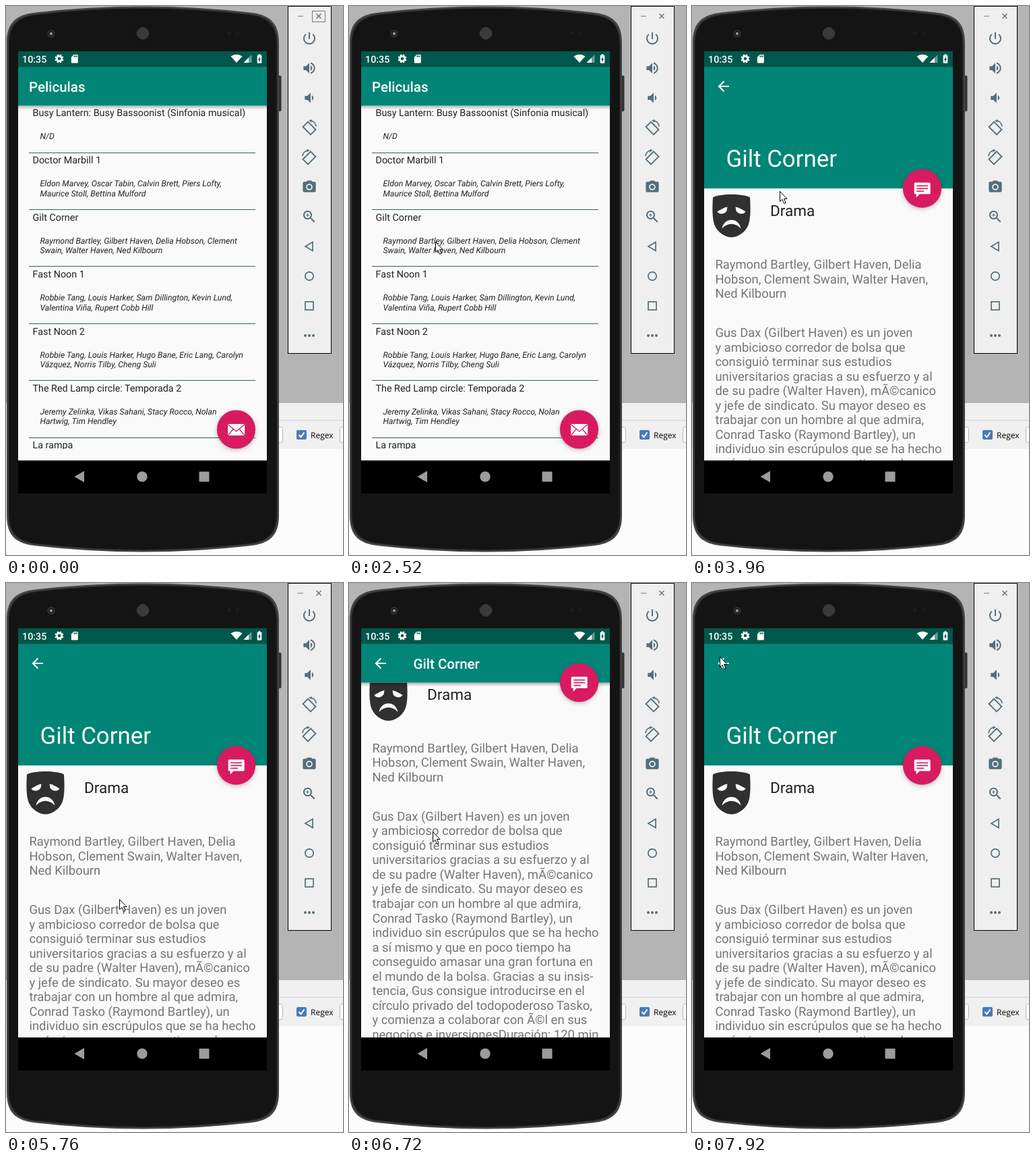
Write an HTML page with a canvas that moves like this. It is 500 px wide and 813 px high and loops after 8 s.

```html
<!DOCTYPE html>
<html lang="es">
<head>
<meta charset="utf-8">
<title>Peliculas</title>
<style>
html, body { margin: 0; width: 100%; height: 100%; overflow: hidden; background: #b4b4b4; }
canvas { display: block; }
</style>
</head>
<body>
<canvas id="stage" width="500" height="813"></canvas>
<script>
const ctx = document.getElementById('stage').getContext('2d');
const LOOP = 8000, STEP = 120, DP = 1.025;
const SCREEN = { x: 18, y: 67, w: 369, bar: 90.5, bottom: 673, end: 722 };
const TEAL = '#008577', PINK = '#d81b60', SLATE = '#546e7a';

const films = [
  ['Busy Lantern: Busy Bassoonist (Sinfonia musical)', 'N/D'],
  ['Doctor Marbill 1', 'Eldon Marvey, Oscar Tabin, Calvin Brett, Piers Lofty,', 'Maurice Stoll, Bettina Mulford'],
  ['Gilt Corner', 'Raymond Bartley, Gilbert Haven, Delia Hobson, Clement', 'Swain, Walter Haven, Ned Kilbourn'],
  ['Fast Noon 1', 'Robbie Tang, Louis Harker, Sam Dillington, Kevin Lund,', 'Valentina Viña, Rupert Cobb Hill'],
  ['Fast Noon 2', 'Robbie Tang, Louis Harker, Hugo Bane, Eric Lang, Carolyn', 'Vázquez, Norris Tilby, Cheng Suli'],
  ['The Red Lamp circle: Temporada 2', 'Jeremy Zelinka, Vikas Sahani, Stacy Rocco, Nolan', 'Hartwig, Tim Hendley'],
  ['La rampa']
];
const cast = ['Raymond Bartley, Gilbert Haven, Delia', 'Hobson, Clement Swain, Walter Haven,', 'Ned Kilbourn'];
const plot = [
  'Gus Dax (Gilbert Haven) es un joven',
  'y ambicioso corredor de bolsa que',
  'consiguió terminar sus estudios',
  'universitarios gracias a su esfuerzo y al',
  'de su padre (Walter Haven), mÃ©canico',
  'y jefe de sindicato. Su mayor deseo es',
  'trabajar con un hombre al que admira,',
  'Conrad Tasko (Raymond Bartley), un',
  'individuo sin escrúpulos que se ha hecho',
  'a sí mismo y que en poco tiempo ha',
  'conseguido amasar una gran fortuna en',
  'el mundo de la bolsa. Gracias a su insis-',
  'tencia, Gus consigue introducirse en el',
  'círculo privado del todopoderoso Tasko,',
  'y comienza a colaborar con Ã©l en sus',
  'negocios e inversionesDuración: 120 min'
];

// Keys: [time, values...], linear in between
const pointer = [
  [240, 0, 533], [480, 159, 238], [720, 159, 238], [1080, 122, 258], [1320, 122, 258],
  [1440, 122, 260], [1680, 123, 258], [1800, 123, 258], [2160, 128, 349], [3360, 128, 349],
  [3480, 130, 280], [3600, 130, 204], [3720, 130, 215], [3960, 130, 274], [4200, 130, 290],
  [4440, 15, 128], [4800, 291, 470], [5040, 180, 613], [5280, 110, 505], [5400, 60, 440],
  [5520, 6, 380], [5760, 168, 468], [5880, 172, 506], [6000, 168, 506], [6720, 124, 368],
  [6840, 120, 375], [7200, 100, 506], [7560, 11, 153], [7680, 16, 140], [7920, 41, 109]
];
const scrolling = [
  [5160, 0], [5400, 138.4], [5520, 138.4], [5760, 0], [6000, 0],
  [6600, 130], [6720, 138.4], [6840, 130], [7200, 0]
];
// Reveal edge, drop and dimming of the page below
const opening = [[3480, 672, 27, 0.01], [3600, 637, 26, 0.04], [3720, 190, 7, 0.08], [3840, 66, 0, 0.1]];

const glyphs = {
  power: 'M13 3h-2v10h2V3zm4.83 2.17l-1.42 1.42C17.99 7.86 19 9.81 19 12c0 3.87-3.13 7-7 7s-7-3.13-7-7c0-2.19 1.01-4.14 2.58-5.42L6.17 5.17C4.23 6.82 3 9.26 3 12c0 4.97 4.03 9 9 9s9-4.03 9-9c0-2.74-1.23-5.18-3.17-6.83z',
  louder: 'M3 9v6h4l5 5V4L7 9H3zm13.5 3c0-1.77-1.02-3.29-2.5-4.03v8.05c1.48-.73 2.5-2.25 2.5-4.02zM14 3.23v2.06c2.89.86 5 3.54 5 6.71s-2.11 5.85-5 6.71v2.06c4.01-.91 7-4.49 7-8.77s-2.99-7.86-7-8.77z',
  quieter: 'M18.5 12c0-1.77-1.02-3.29-2.5-4.03v8.05c1.48-.73 2.5-2.25 2.5-4.02zM5 9v6h4l5 5V4L9 9H5z',
  camera: 'M9 2L7.17 4H4c-1.1 0-2 .9-2 2v12c0 1.1.9 2 2 2h16c1.1 0 2-.9 2-2V6c0-1.1-.9-2-2-2h-3.17L15 2H9zm3 15c-2.76 0-5-2.24-5-5s2.24-5 5-5 5 2.24 5 5-2.24 5-5 5zM8.8 12a3.2 3.2 0 1 0 6.4 0a3.2 3.2 0 1 0-6.4 0z',
  zoom: 'M15.5 14h-.79l-.28-.27C15.41 12.59 16 11.11 16 9.5 16 5.91 13.09 3 9.5 3S3 5.91 3 9.5 5.91 16 9.5 16c1.61 0 3.09-.59 4.23-1.57l.27.28v.79l5 4.99L20.49 19l-4.99-5zm-6 0C7.01 14 5 11.99 5 9.5S7.01 5 9.5 5 14 7.01 14 9.5 11.99 14 9.5 14zM12 10h-2v2H9v-2H7V9h2V7h1v2h2v1z',
  back: 'M20 11H7.83l5.59-5.59L12 4l-8 8 8 8 1.41-1.41L7.83 13H20v-2z',
  card: 'M18 2h-8L4.02 8 4 20c0 1.1.9 2 2 2h12c1.1 0 2-.9 2-2V4c0-1.1-.9-2-2-2zm-6 6h-2V4h2v4zm3 0h-2V4h2v4zm3 0h-2V4h2v4z',
  battery: 'M15.67 4H14V2h-4v2H8.33C7.6 4 7 4.6 7 5.33v15.33C7 21.4 7.6 22 8.33 22h7.33c.74 0 1.34-.6 1.34-1.33V5.33C17 4.6 16.4 4 15.67 4zM11 20v-5.5H9L13 7v5.5h2L11 20z'
};
for (const k in glyphs) glyphs[k] = new Path2D(glyphs[k]);

const mix = (a, b, u) => a + (b - a) * u;

function sample(keys, t) {
  if (t <= keys[0][0]) return keys[0].slice(1);
  for (let i = 1; i < keys.length; i++) {
    const [a, b] = [keys[i - 1], keys[i]];
    if (t <= b[0]) {
      const u = (t - a[0]) / (b[0] - a[0]);
      return a.slice(1).map((v, j) => mix(v, b[j + 1], u));
    }
  }
  return keys[keys.length - 1].slice(1);
}

function box(x, y, w, h, color) {
  ctx.fillStyle = color;
  ctx.fillRect(x, y, w, h);
}
function paint(color, edge) {
  if (color) { ctx.fillStyle = color; ctx.fill(); }
  if (edge) { ctx.strokeStyle = edge; ctx.stroke(); }
}
function round(x, y, w, h, r, color, edge) {
  ctx.beginPath();
  ctx.roundRect(x, y, w, h, r);
  paint(color, edge);
}
function disc(x, y, r, color, edge) {
  ctx.beginPath();
  ctx.arc(x, y, r, 0, 7);
  paint(color, edge);
}
function poly(points, color, edge, open) {
  ctx.beginPath();
  points.forEach(([x, y]) => ctx.lineTo(x, y));
  if (!open) ctx.closePath();
  paint(color, edge);
}
function text(str, x, y, size, color, style = '', family = 'Roboto') {
  ctx.font = `${style} ${size}px ${family}, sans-serif`;
  ctx.fillStyle = color;
  ctx.fillText(str, x, y);
}
function icon(name, x, y, size, color) {
  ctx.save();
  ctx.translate(x - size / 2, y - size / 2);
  ctx.scale(size / 24, size / 24);
  ctx.fillStyle = color;
  ctx.fill(glyphs[name], 'evenodd');
  ctx.restore();
}
function clipped(x, y, w, h, draw) {
  ctx.save();
  ctx.beginPath();
  ctx.rect(x, y, w, h);
  ctx.clip();
  draw();
  ctx.restore();
}

function desktop() {
  box(0, 0, 500, 588, '#b4b4b4');
  box(0, 588, 500, 68, '#f0f0f0');
  box(0, 613, 500, 1, '#d4d4d4');
  box(0, 656, 500, 157, '#fcfcfc');
  round(380.5, 623.5, 30, 23, 3, '#fff', '#b4b4b4');
  round(495.5, 623.5, 30, 23, 3, '#fff', '#b4b4b4');
  round(431, 628, 15, 14, 2, '#4a7ab8');
  ctx.lineWidth = 2;
  poly([[434.5, 635], [437.5, 638.5], [442.5, 631.5]], null, '#fff', true);
  ctx.lineWidth = 1;
  text('Regex', 452, 639.5, 12, '#000', '', '"Open Sans"');
}

// Body with gently arched top and bottom
function shell(inset, color) {
  ctx.save();
  ctx.translate(203, 404.5);
  ctx.scale(1 - inset / 202, 1 - inset / 404);
  ctx.beginPath();
  for (const s of [1, -1]) {
    ctx.lineTo(-202 * s, -350 * s);
    ctx.bezierCurveTo(-202 * s, -380 * s, -188 * s, -392 * s, -158 * s, -395 * s);
    ctx.quadraticCurveTo(0, -413 * s, 158 * s, -395 * s);
    ctx.bezierCurveTo(188 * s, -392 * s, 202 * s, -380 * s, 202 * s, -350 * s);
  }
  ctx.closePath();
  paint(color);
  ctx.restore();
}

function phone() {
  round(402, 103, 6.5, 53, 2, '#333');
  shell(0, '#444');
  shell(2.2, '#2a2a2a');
  shell(3.6, '#141414');
  disc(67, 41, 5.5, '#3a3a3a');
  disc(67, 41, 4, '#15181c');
  disc(67, 41, 2.3, '#868c93');
  disc(203, 40.5, 9.5, '#2c2c2c');
  for (let j = -4; j <= 4; j++) for (let i = -4; i <= 4; i++)
    if (i * i + j * j < 18) box(202.5 + i * 2, 40 + j * 2, 1, 1, '#666');
  disc(331, 40, 3, '#201c1c');
  disc(343, 40, 2.5, '#1d1a1a');
}

function turnIcon(y, dir) {
  ctx.save();
  ctx.translate(450, y);
  ctx.scale(dir, 1);
  ctx.lineWidth = 1.8;
  poly([[-2, -8.5], [9.5, 3], [2, 10.5], [-9.5, -1]], null, SLATE);
  ctx.lineWidth = 1.5;
  ctx.beginPath();
  ctx.arc(0, 0, 10.3, -1.4, -0.15);
  paint(null, SLATE);
  poly([[-1, -10.5], [3.5, -12], [3.5, -7.5]], SLATE);
  ctx.restore();
}

function toolPanel(focused) {
  ctx.lineWidth = 1;
  box(418, 0, 65, 515, '#000');
  box(419, 1, 63, 513, '#efefef');
  box(433, 14.5, 8, 1.3, '#8a979d');
  ctx.lineWidth = 1.4;
  poly([[460.5, 11.5], [467.5, 18.5]], null, '#66757d', true);
  poly([[467.5, 11.5], [460.5, 18.5]], null, '#66757d', true);
  ctx.lineWidth = 1;
  if (focused) {
    ctx.setLineDash([1, 1]);
    ctx.strokeStyle = '#000';
    ctx.strokeRect(454.5, 7.5, 19, 16);
    ctx.setLineDash([]);
  }
  icon('power', 450, 48, 24, SLATE);
  icon('louder', 450, 92, 23, SLATE);
  icon('quieter', 450, 136, 23, SLATE);
  turnIcon(180, 1);
  turnIcon(224, -1);
  icon('camera', 450, 268, 23, SLATE);
  icon('zoom', 450, 312, 24, SLATE);
  ctx.lineWidth = 1.7;
  poly([[455, 349.5], [455, 362.5], [444, 356]], null, SLATE);
  disc(450, 400, 6.2, null, SLATE);
  ctx.strokeStyle = SLATE;
  ctx.strokeRect(444, 438, 12, 12);
  for (const x of [444, 450, 456]) disc(x, 488, 2, SLATE);
  ctx.lineWidth = 1;
}

function statusBar() {
  box(SCREEN.x, SCREEN.y, SCREEN.w, SCREEN.bar - SCREEN.y, '#00574b');
  text('10:35', 24, 83.8, 14.35, '#fff', '500');
  ctx.lineWidth = 2.6;
  for (let i = 0; i < 4; i++) {
    const a = i * Math.PI / 4 + 0.39, dx = 6.4 * Math.cos(a), dy = 6.4 * Math.sin(a);
    poly([[79 - dx, 78 - dy], [79 + dx, 78 + dy]], null, '#fff', true);
  }
  ctx.lineWidth = 1;
  disc(79, 78, 5, '#fff');
  disc(79, 78, 2.3, '#00574b');
  icon('card', 101.8, 78.3, 15, '#fff');
  ctx.beginPath();
  ctx.moveTo(342, 84);
  ctx.lineTo(333.5, 74.5);
  ctx.quadraticCurveTo(342, 69, 350.5, 74.5);
  ctx.closePath();
  paint('#fff');
  poly([[364.5, 72], [364.5, 84], [352.5, 84]], 'rgba(255,255,255,.4)');
  poly([[360, 76.5], [360, 84], [352.5, 84]], '#fff');
  icon('battery', 376, 78, 16, '#fff');
}

function shadow(y) {
  const g = ctx.createLinearGradient(0, y, 0, y + 6);
  g.addColorStop(0, 'rgba(0,0,0,.28)');
  g.addColorStop(1, 'rgba(0,0,0,0)');
  box(SCREEN.x, y, SCREEN.w, 6, g);
}

function fab(y) {
  ctx.save();
  ctx.shadowColor = 'rgba(0,0,0,.25)';
  ctx.shadowBlur = 6;
  ctx.shadowOffsetY = 2;
  disc(341.5, y, 28.6, PINK);
  ctx.restore();
}

function envelope(x, y) {
  round(x - 12.5, y - 8.5, 25, 17, 1.5, '#fff');
  ctx.lineWidth = 1.3;
  poly([[x - 12, y - 7.5], [x, y + 2.5], [x + 12, y - 7.5]], null, PINK, true);
  poly([[x - 12, y + 8], [x - 4.5, y - 1]], null, PINK, true);
  poly([[x + 12, y + 8], [x + 4.5, y - 1]], null, PINK, true);
  ctx.lineWidth = 1;
}

function bubble(x, y) {
  round(x - 12, y - 9, 24, 17, 1.5, '#fff');
  poly([[x - 9, y + 7], [x - 9, y + 13], [x - 3, y + 7]], '#fff');
  [17, 17, 11].forEach((w, i) => box(x - 8.5, y - 5 + i * 4, w, 1.7, PINK));
}

function listPage() {
  box(SCREEN.x, SCREEN.bar, SCREEN.w, 583, '#fafafa');
  clipped(SCREEN.x, 148, SCREEN.w, 508, () => {
    let y = 163.1;
    for (const [title, ...names] of films) {
      text(title, 39.5, y, 14 * DP, '#212121');
      names.forEach((s, i) => text(s, 50.5, y + 34 + i * 14.4, 12 * DP, '#212121', 'italic'));
      y += names.length > 1 ? 84.4 : 70.2;
      box(34, Math.round(y - 16.7), 336, 1, '#3d5f59');
    }
  });
  box(SCREEN.x, SCREEN.bar, SCREEN.w, 57, TEAL);
  shadow(147.5);
  text('Peliculas', 34, 127, 20 * DP, '#fff', '500');
  fab(627);
  envelope(341.7, 627.5);
}

function mask(y) {
  ctx.save();
  ctx.translate(58.5, y);
  ctx.fillStyle = '#303030';
  ctx.fill(new Path2D('M-27.5 -27C-18 -33 18 -33 27.5 -27C28.5 -10 28.5 5 25 14C20 26 8 32 0 32C-8 32 -20 26 -25 14C-28.5 5 -28.5 -10 -27.5 -27Z'));
  ctx.fillStyle = '#fafafa';
  for (const side of [-1, 1]) {
    ctx.save();
    ctx.scale(side, 1);
    ctx.fill(new Path2D('M6 -13C11 -12 16 -9 21 -6C18 -1 10 -2 7 -7Z'));
    ctx.restore();
  }
  ctx.fill(new Path2D('M-14 19C-11 2 11 2 14 19C6 10 -6 10 -14 19Z'));
  ctx.restore();
}

function detailPage(scroll) {
  const up = Math.min(scroll, 122.7), u = up / 122.7, edge = 270.2 - up;
  box(SCREEN.x, SCREEN.bar, SCREEN.w, 583, '#fafafa');
  clipped(SCREEN.x, edge, SCREEN.w, SCREEN.bottom - edge, () => {
    mask(310.5 - scroll);
    text('Drama', 116, 311 - scroll, 22 * DP, '#212121');
    cast.forEach((s, i) => text(s, 34.4, 389 + i * 21.56 - scroll, 18 * DP, '#757575'));
    plot.forEach((s, i) => text(s, 34.4, 490 + i * 21.56 - scroll, 18 * DP, '#757575'));
  });
  box(SCREEN.x, SCREEN.bar, SCREEN.w, edge - SCREEN.bar, TEAL);
  if (u === 1) shadow(edge);
  icon('back', 46.7, 119, 24 * DP, '#fff');
  text(films[2][0], mix(50.5, 95.5, u), mix(238.2, 126.5, u), mix(34, 20, u) * DP, '#fff', u > 0.95 ? '500' : '');
  fab(edge);
  bubble(341.7, edge + 0.3);
}

function navBar() {
  box(SCREEN.x, SCREEN.bottom, SCREEN.w, SCREEN.end - SCREEN.bottom, '#000');
  poly([[116, 688.5], [116, 705.5], [101.5, 697]], '#9c9c9c');
  disc(202, 697, 7.7, '#9c9c9c');
  round(286.5, 689.5, 15, 15, 1, '#9c9c9c');
}

function arrow(x, y) {
  ctx.save();
  ctx.translate(x + 0.5, y + 0.5);
  poly([[0, 0], [0, 15], [3.5, 12], [6, 18], [8.5, 17], [6, 11], [10.5, 11]], '#fff', '#000');
  ctx.restore();
}

function screen(t) {
  const [top, drop, dim] = sample(opening, t);
  const moving = t >= 3480 && t < 3840;
  const height = SCREEN.bottom - SCREEN.y;
  if (t < 3840) {
    clipped(SCREEN.x, SCREEN.y, SCREEN.w, height, () => {
      ctx.translate(0, moving ? -dim * 15 : 0);
      listPage();
    });
    navBar();
    statusBar();
    if (moving) {
      box(SCREEN.x, SCREEN.y, SCREEN.w, height, `rgba(0,0,0,${dim})`);
      clipped(SCREEN.x, top, SCREEN.w, SCREEN.bottom + drop - top, () => {
        ctx.translate(0, drop);
        detailPage(0);
      });
    }
  } else {
    detailPage(sample(scrolling, t)[0]);
    navBar();
    statusBar();
  }
}

function render(t) {
  ctx.textRendering = 'geometricPrecision';
  ctx.lineWidth = 1;
  desktop();
  phone();
  toolPanel(t < 2520);
  screen(t);
  if (t >= 240) arrow(...sample(pointer, t).map(Math.round));
}

let start, shown = -1;
function tick(now) {
  start ??= now;
  const t = Math.floor(((now - start) % LOOP) / STEP) * STEP;
  if (t !== shown) render(shown = t);
  requestAnimationFrame(tick);
}
render(0);
requestAnimationFrame(tick);
</script>
</body>
</html>
```
